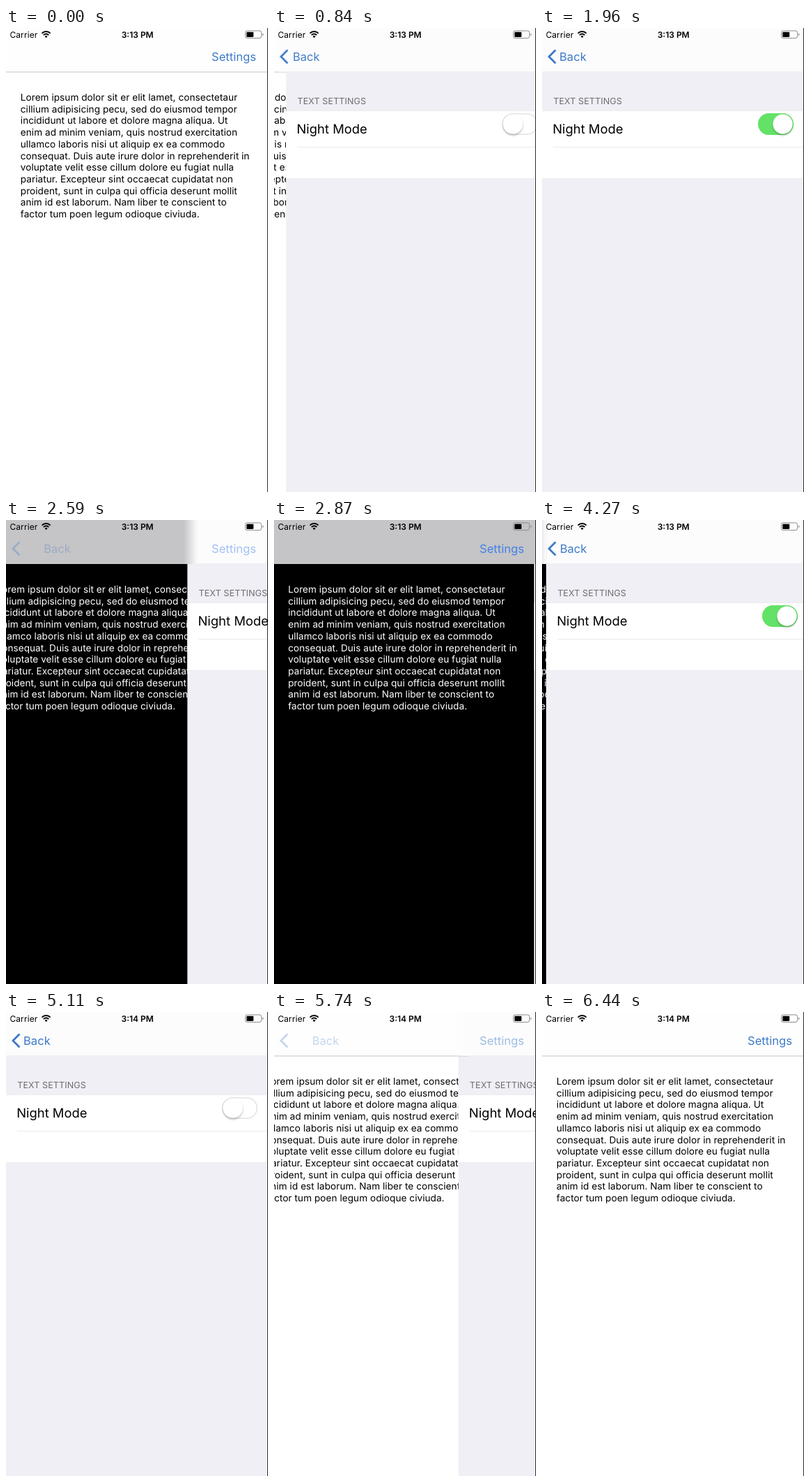
Recreate the animation shown at these times as an HTML page. Size 376 px wide and 664 px high, loop 6.65 s.

```html
<!DOCTYPE html>
<html lang="en">
<head>
<meta charset="utf-8">
<title>Night mode settings</title>
<style>
  html, body { margin: 0; width: 100%; height: 100%; overflow: hidden; background: #fff; }
  svg { display: block; width: 376px; height: 664px; }
  text { font-family: Inter, Roboto, "Liberation Sans", sans-serif; white-space: pre; text-rendering: geometricPrecision; }
  .body { font-size: 13.6px; letter-spacing: .04px; }
  .bar { font-size: 16.5px; letter-spacing: .05px; }
  .head { font-size: 12.6px; letter-spacing: .08px; fill: #6d6d72; }
  .cell { font-size: 18.4px; }
  .status { font-size: 12px; }
  .clock { font-weight: 600; text-anchor: middle; }
</style>
</head>
<body>
<svg viewBox="0 0 376 664">
  <defs>
    <linearGradient id="edge">
      <stop offset="0" stop-color="#fcfcfd" stop-opacity="0"/>
      <stop offset="1" stop-color="#fcfcfd"/>
    </linearGradient>
    <filter id="soft" x="-40%" y="-40%" width="180%" height="190%">
      <feDropShadow dx="0" dy="2" stdDeviation="1.6" flood-opacity=".28"/>
    </filter>
  </defs>

  <rect id="paper" width="376" height="664"/>
  <g id="article" class="body"></g>

  <g id="table">
    <rect y="62" width="376" height="602" fill="#f0eff5"/>
    <text class="head" x="16.2" y="108.5">TEXT SETTINGS</text>
    <rect y="118.5" width="376" height="97" fill="#e9e8ed"/>
    <rect y="119" width="376" height="96" fill="#fff"/>
    <rect x="16" y="170" width="360" height="1" fill="#ebebed"/>
    <text class="cell" x="15.2" y="151">Night Mode</text>
    <g transform="translate(310 122)">
      <rect x=".75" y=".75" width="49.5" height="29.5" rx="14.75" fill="#fff" stroke="#e3e3e5" stroke-width="1.5"/>
      <rect id="track" width="51" height="31" rx="15.5" fill="#64e268"/>
      <rect id="knob" y="1.5" height="28" rx="14" fill="#fff" filter="url(#soft)"/>
    </g>
  </g>

  <rect id="bar" width="376" height="63"/>
  <rect id="rule" y="62.5" width="376" height="1" fill="#c6c6c8"/>
  <g id="barCover">
    <rect x="-20" width="20" height="63" fill="url(#edge)"/>
    <rect width="376" height="62.2" fill="#fcfcfd"/>
    <rect y="62" width="376" height="2" fill="#f0eff5"/>
  </g>

  <text id="settings" class="bar" x="295" y="47">Settings</text>
  <path id="arrow" d="M19.5 31.5 10 41 19.5 50.5" fill="none" stroke="#3c78c6" stroke-width="2.8"/>
  <text id="back" class="bar" y="47" fill="#3c78c6">Back</text>

  <text class="status" x="5.4" y="13.6" letter-spacing=".1">Carrier</text>
  <g fill="none" stroke="#000" stroke-width="2">
    <path d="M51.6 7.6a8.4 8.4 0 0 1 12 0"/>
    <path d="M53.9 10.1a5.2 5.2 0 0 1 7.4 0"/>
  </g>
  <path d="M57.6 14.2 55.6 12a2.9 2.9 0 0 1 4 0z"/>
  <text id="clock" class="status clock" x="188.7" y="13.6"></text>
  <rect x="343.5" y="4" width="23" height="10.6" rx="2.6" fill="none" stroke="#8b8b8d"/>
  <rect x="345.2" y="5.7" width="10" height="7.2" rx="1"/>
  <path d="M368 7.4a2 2 0 0 1 0 3.8z" fill="#8b8b8d"/>
  <rect x="375" width="1" height="664" fill="#2a2a2a"/>
</svg>

<script>
const LOOP = 6650, STEP = 70, WIDTH = 375;
const PUSH = [571, 3931], POP = [2456, 5603], PRESS = [2240, 5390];
const FLIP_ON = 1640, FLIP_OFF = 4790, MINUTE = 5000;
const lines = [
  "Lorem ipsum dolor sit er elit lamet, consectetaur",
  "cillium adipisicing pecu, sed do eiusmod tempor",
  "incididunt ut labore et dolore magna aliqua. Ut",
  "enim ad minim veniam, quis nostrud exercitation",
  "ullamco laboris nisi ut aliquip ex ea commodo",
  "consequat. Duis aute irure dolor in reprehenderit in",
  "voluptate velit esse cillum dolore eu fugiat nulla",
  "pariatur. Excepteur sint occaecat cupidatat non",
  "proident, sunt in culpa qui officia deserunt mollit",
  "anim id est laborum. Nam liber te conscient to",
  "factor tum poen legum odioque civiuda."
];

const $ = id => document.getElementById(id);
const set = (id, attrs) => {
  for (const k in attrs) $(id).setAttribute(k, attrs[k]);
};
const clamp = v => Math.min(1, Math.max(0, v));
const smooth = v => { v = clamp(v); return v * v * (3 - 2 * v); };
const slide = x => ({ transform: `translate(${x.toFixed(2)} 0)` });

// Critically damped spring from 0 to 1
const spring = ms => {
  if (ms <= 0) return 0;
  const u = ms * .018;
  return 1 - (1 + u) * Math.exp(-u);
};

lines.forEach((line, i) => {
  const el = document.createElementNS("http://www.w3.org/2000/svg", "text");
  el.setAttribute("x", 20.8);
  el.setAttribute("y", (104 + i * 16.7).toFixed(1));
  el.textContent = line;
  $("article").append(el);
});

function drawSwitch(t) {
  const on = smooth((t - FLIP_ON) / 240) - smooth((t - FLIP_OFF) / 240);
  const squeeze = start => smooth((t - start + 90) / 90) - smooth((t - start - 120) / 150);
  const width = 28 + 6 * (squeeze(FLIP_ON) + squeeze(FLIP_OFF));
  set("track", { opacity: on });
  set("knob", { x: 1.5 + on * (48 - width), width });
}

function draw(t) {
  const shown = PUSH.reduce((s, p) => s + spring(t - p), 0)
              - POP.reduce((s, p) => s + spring(t - p), 0);
  const dark = t >= 2100 && t < 5250;
  const x = WIDTH * (1 - shown);
  const pressed = PRESS.some((p, i) => t >= p + STEP && t < POP[i] + 400);

  set("paper", { fill: dark ? "#000" : "#fff" });
  set("article", { fill: dark ? "#fff" : "#000", ...slide(-.3 * WIDTH * shown) });
  set("bar", { fill: dark ? "#c5c4c6" : "#fefefe" });
  set("rule", { opacity: dark ? 0 : 1 });
  set("table", slide(x));
  // The soft edge leaves the bar completely when the page is gone
  set("barCover", slide(x + 21 * (1 - shown)));

  const backOpacity = Math.min(clamp(shown), pressed ? .35 : 1);
  set("settings", { fill: dark ? "#3f82ea" : "#3c7bc8", opacity: clamp(1 - shown) ** 2 });
  set("arrow", { opacity: backOpacity });
  set("back", { x: 25 + 42 * (1 - shown), opacity: backOpacity });
  $("clock").textContent = t < MINUTE ? "3:13 PM" : "3:14 PM";
  drawSwitch(t);
}

const begin = performance.now();
function tick() {
  const t = (performance.now() - begin) % LOOP;
  draw(Math.floor(t / STEP) * STEP);
  requestAnimationFrame(tick);
}
tick();
</script>
</body>
</html>
```
